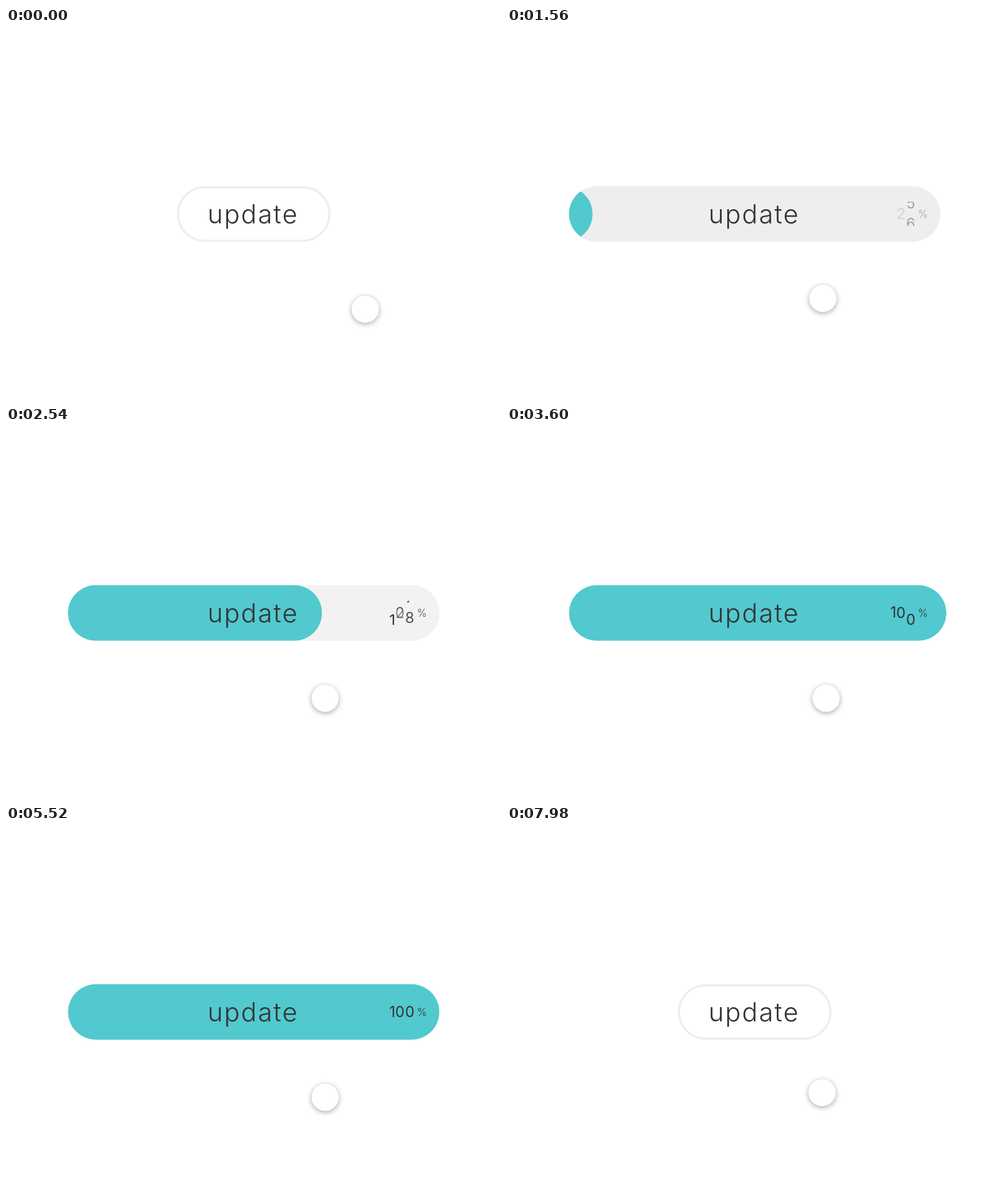
Write an HTML page with a canvas that moves like this. It is 800x600 px and loops after 8 s.

```html
<!DOCTYPE html>
<html lang="en">
<head>
<meta charset="utf-8">
<title>Update button</title>
<style>
  html, body { margin: 0; width: 100%; height: 100%; overflow: hidden; background: #fff; }
  canvas { display: block; }
</style>
</head>
<body>
<canvas id="stage" width="800" height="600"></canvas>
<script>
const ctx = document.getElementById('stage').getContext('2d');
const LOOP = 8000, TOP = 255.8, HEIGHT = 90, LEFT = 100.2, WIDTH = 600.3;
const INK = '#333', TEAL = '#51c9cf';

const clamp = v => Math.min(1, Math.max(0, v));
const lerp = (a, b, u) => a + (b - a) * u;
const span = (t, from, to) => clamp((t - from) / (to - from));
const cubic = u => u < .5 ? 4 * u ** 3 : 1 - 4 * (1 - u) ** 3;
const smooth = u => u * u * (3 - 2 * u);

// Eased steps between keys of the form [time, value, value, ...]
function steps(t, keys) {
  const i = keys.findIndex(k => k[0] > t);
  if (i < 0) return keys.at(-1).slice(1);
  const [a, b] = [keys[i - 1], keys[i]];
  const u = smooth(span(t, a[0], b[0]));
  return a.slice(1).map((v, n) => lerp(v, b[n + 1], u));
}

// Smooth curve through [time, value] keys, at rest at both ends
function curve(t, keys) {
  if (t <= keys[0][0]) return keys[0][1];
  const i = keys.findIndex(k => k[0] > t);
  if (i < 0) return keys.at(-1)[1];
  const slope = n => n < 1 || n > keys.length - 2 ? 0
    : (keys[n + 1][1] - keys[n - 1][1]) / (keys[n + 1][0] - keys[n - 1][0]);
  const [t0, a] = keys[i - 1], [t1, b] = keys[i];
  const d = t1 - t0, u = (t - t0) / d;
  return lerp(a, b, smooth(u))
    + d * u * (1 - u) * ((1 - u) * slope(i - 1) - u * slope(i));
}

const FILL = [[1400, 0], [1560, .063], [2200, .36], [2540, .683],
  [3020, .93], [3600, 1.016], [4200, 1.005], [4700, 1]];
const ONES = [[1340, 5], [1560, 5.5], [2540, 7.74], [3600, 9.64], [4100, 10]];
const CURSOR = [[0, 580.6, 454.8], [360, 460, 325], [460, 460, 325], [1140, 510.6, 437.4],
  [2220, 510.6, 437.4], [2500, 515.8, 438.8], [7680, 515.8, 438.8], [8300, 502, 423]];

function pill(x, width, inset = 0) {
  ctx.beginPath();
  ctx.roundRect(x + inset, TOP + inset, width - 2 * inset, HEIGHT - 2 * inset, HEIGHT / 2 - inset);
}

function fillPill(x, width, color, alpha = 1) {
  ctx.globalAlpha = alpha;
  ctx.fillStyle = color;
  pill(x, width);
  ctx.fill();
  ctx.globalAlpha = 1;
}

function outline(x, width, alpha = 1) {
  ctx.globalAlpha = alpha;
  ctx.strokeStyle = '#eee';
  ctx.lineWidth = 3.4;
  pill(x, width, 1.7);
  ctx.stroke();
  ctx.globalAlpha = 1;
}

function text(str, x, y, size, alpha = 1, weight = 400, spacing = 0) {
  ctx.globalAlpha = clamp(alpha);
  ctx.fillStyle = INK;
  ctx.font = `${weight} ${size}px Inter, sans-serif`;
  ctx.letterSpacing = spacing + 'px';
  ctx.textAlign = 'center';
  ctx.fillText(str, x, y);
  ctx.globalAlpha = 1;
}

const digit = (d, x, shift, alpha) => text(d, x, 308.5 + shift, 24, alpha, 380);

function counter(t, progress, leave, fade) {
  const show = .32 * span(t, 860, 1160) + .68 * span(t, 1400, 2850);
  const alpha = show * fade;
  text('%', 672.3, 307, 17, alpha, 320);

  ctx.save();
  ctx.beginPath();
  ctx.rect(612, 281, 60, 39);
  ctx.clip();
  digit('1', 624.5, (1 - progress) * 40 + leave * 28, fade * span(t, 1700, 2300));

  const swap = span(t, 2100, 2980);
  digit('2', 636.5, 0, span(t, 1400, 2540) * (1 - swap));
  digit('0', 636.5, 0, swap * (1 - 3 * leave));
  digit('5', 643, 12 * (1 - leave), fade * clamp(leave * 3));

  const ones = curve(t, ONES), low = Math.floor(ones), part = ones - low;
  if (t < 3100 || low > 9) digit(low % 10, 652.5, -33 * part, alpha * (1 - .3 * clamp(leave * 3)));
  if (part) digit((low + 1) % 10, 652.5, 33 * (1 - part), alpha);
  ctx.restore();
}

function cursor(t) {
  const [x, y] = steps(t, CURSOR);
  ctx.save();
  ctx.shadowColor = 'rgba(0,0,0,.35)';
  ctx.shadowBlur = 9;
  ctx.shadowOffsetY = 2;
  ctx.fillStyle = '#fff';
  ctx.beginPath();
  ctx.arc(x, y, 22, 0, 7);
  ctx.fill();
  ctx.restore();
}

function draw(t) {
  ctx.fillStyle = '#fff';
  ctx.fillRect(0, 0, 800, 600);

  const grow = cubic(span(t, 300, 1160));
  const shrink = cubic(span(t, 6440, 7010));
  const leave = smooth(span(t, 6390, 7000));
  const fade = 1 - leave;
  const progress = curve(t, FILL);
  const inset = 176 * (1 - grow + shrink);
  const x = LEFT + inset, width = WIDTH - 2 * inset;

  if (t < 6320) {
    const grey = lerp(238, 241.5, span(t, 2180, 2540));
    fillPill(x, width, `rgb(${grey},${grey},${grey})`, grow);
    if (grow < 1) outline(x, width);
    if (progress > 0) {
      const reach = WIDTH * progress, room = Math.max(WIDTH, reach);
      ctx.save();
      pill(LEFT, room);
      ctx.clip();
      fillPill(LEFT + reach - room, room, TEAL);
      ctx.restore();
    }
  } else {
    fillPill(LEFT, WIDTH, '#eee', clamp(fade * 1.38));
    fillPill(x, width, TEAL, fade);
    outline(x, width, span(t, 6680, 6960));
  }

  if (t < 7000) counter(t, progress, leave, fade);
  text('update', 399.3, 316, 42, 1, 350, 2);
  cursor(t);
}

function frame() {
  draw(performance.now() % LOOP);
  requestAnimationFrame(frame);
}
frame();
</script>
</body>
</html>
```
